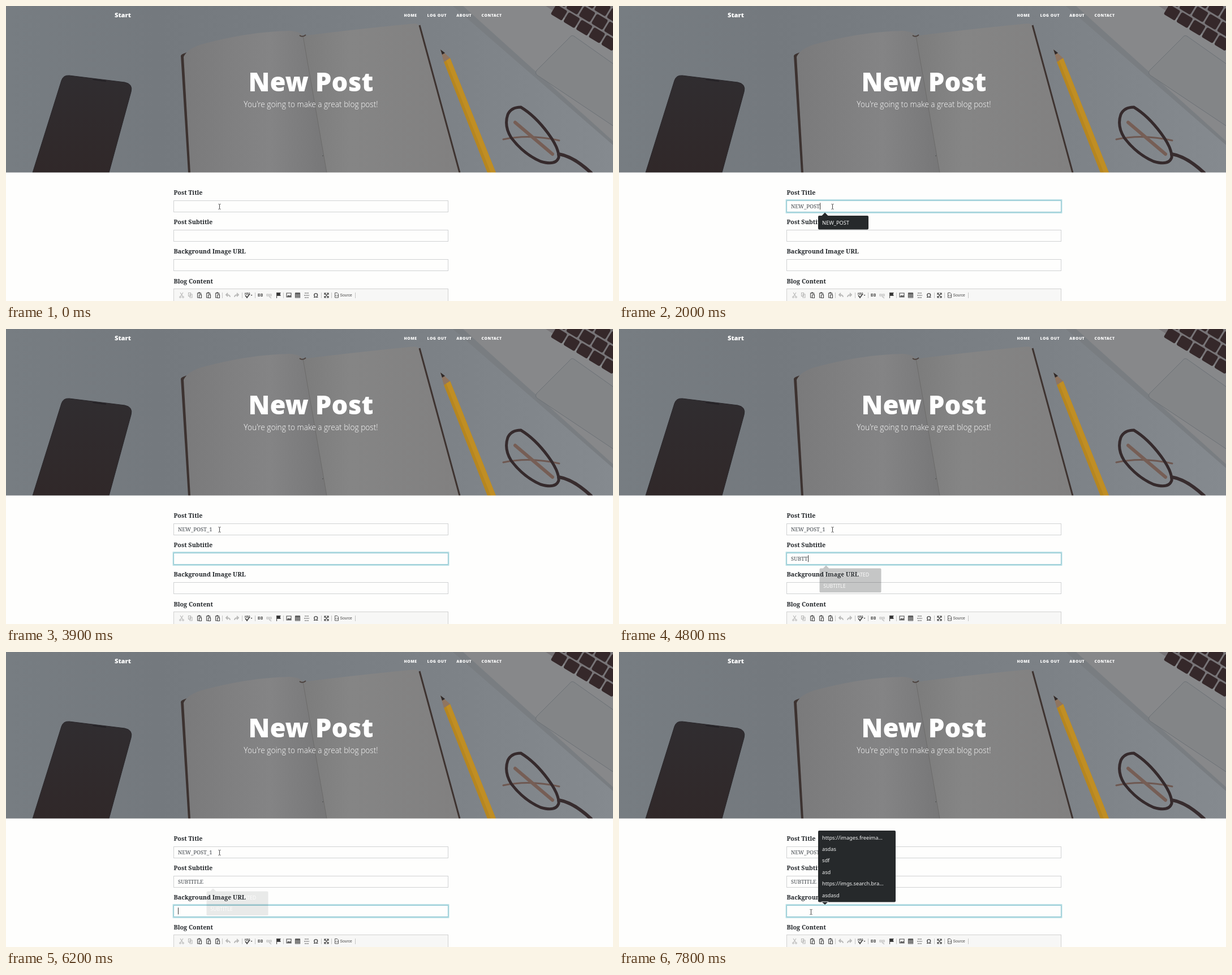
Recreate the animation shown at these times as an HTML page. Size 1073 by 522 pixels, loop 8000 ms.

```html
<!DOCTYPE html>
<html lang="en">
<head>
<meta charset="utf-8">
<title>New Post</title>
<style>
  html, body { margin: 0; width: 100%; height: 100%; overflow: hidden; background: #fefefd; }
  svg { display: block; width: 1073px; height: 522px; }
  text { white-space: pre; }
  .sans { font-family: "Open Sans", sans-serif; font-weight: 800; fill: #fff; }
  .nav { font-size: 6.8px; letter-spacing: .56px; }
  .label { font: 700 10.75px "Noto Serif", serif; fill: #212529; }
  .value { font: 9.5px "Noto Serif", serif; fill: #40464c; }
  .item { font: 500 9.25px "Noto Sans", sans-serif; fill: #f4f5f5; }
</style>
</head>
<body>
<svg id="stage" viewBox="0 0 1073 522">
  <defs>
    <linearGradient id="desk">
      <stop offset="0" stop-color="#777d82"/><stop offset=".25" stop-color="#74797e"/>
      <stop offset=".7" stop-color="#7c8186"/><stop offset="1" stop-color="#858a8f"/>
    </linearGradient>
    <linearGradient id="leftPage">
      <stop offset="0" stop-color="#7a7a7b"/><stop offset=".6" stop-color="#848485"/><stop offset="1" stop-color="#777778"/>
    </linearGradient>
    <linearGradient id="rightPage">
      <stop offset="0" stop-color="#7c7c7c"/><stop offset=".3" stop-color="#858585"/><stop offset="1" stop-color="#818080"/>
    </linearGradient>
    <linearGradient id="phone" x2="0" y2="1">
      <stop offset="0" stop-color="#302d30"/><stop offset="1" stop-color="#302829"/>
    </linearGradient>
  </defs>

  <g id="hero">
    <rect width="1073" height="295" fill="url(#desk)"/>
    <path d="M47 295 98 132Q101 122 112 123L210 135Q225 138 221 152L182 295Z" fill="url(#phone)" stroke="#29272b"/>
    <path d="M154 130 176 133" stroke="#242226" stroke-width="2" stroke-linecap="round"/>

    <path d="M309 88Q310 84 326 81L330 295H322Z" fill="#3c3230"/>
    <path d="M314 90Q320 76 345 68Q430 45 502 44Q520 45 525 53L567 295H326Z" fill="url(#leftPage)"/>
    <path d="M525 53Q600 43 722 31Q730 31 733 39L801 295H567Z" fill="url(#rightPage)"/>
    <path d="M525 53 567 295" stroke="#6c6b6a" fill="none"/>
    <path d="M519 52Q524 56 530 51" stroke="#4a403c" stroke-width="2" fill="none"/>
    <path d="M731 34 802 295" stroke="#3e3330" stroke-width="3"/>
    <circle cx="560" cy="265" r=".8" fill="#444"/>

    <path d="M774 99 851 295H866L785 92Z" fill="#b68620"/>
    <path d="M778 96 857 295H866L785 92Z" fill="#c08e24"/>
    <path d="M768 77 774 99 785 92Z" fill="#8f7561"/>
    <path d="M768 77 771 86 776 83Z" fill="#2f2929"/>

    <path d="M790 0H1073V246Z" fill="#797d81"/>
    <path d="M808 0H1073V239Z" fill="#87888a"/>
    <path d="M1073 102 1005 54Q1000 50 996 56L938 114Q934 119 940 123L1073 212" fill="#838587" stroke="#6c7176"/>
    <path d="M954 0 1073 76V0Z" fill="#777477"/>
    <g id="keys" transform="translate(976 -8) rotate(31)" fill="#35282a"></g>

    <g fill="none" stroke-linecap="round">
      <path d="M879 236Q925 226 978 238" stroke="#6e5851" stroke-width="3"/>
      <path d="M900 206 966 262" stroke="#765e55" stroke-width="6"/>
      <path d="M910 179Q893 179 887 192Q880 212 893 233Q915 262 945 275Q972 283 977 268Q978 252 958 225Q935 194 910 179Z" stroke="#352a2c" stroke-width="5"/>
      <path d="M977 262Q1003 266 1034 295" stroke="#372c2e" stroke-width="6"/>
    </g>
  </g>

  <g class="sans">
    <text x="192" y="20" font-size="11.2">Start</text>
    <g class="nav">
      <text x="703.5" y="18.6">HOME</text><text x="744.5" y="18.6">LOG OUT</text>
      <text x="796.3" y="18.6">ABOUT</text><text x="840.6" y="18.6">CONTACT</text>
    </g>
    <text x="539" y="151" font-size="45.4" text-anchor="middle">New Post</text>
    <text x="539" y="179" font-size="13.7" text-anchor="middle" style="font-weight:300">You're going to make a great blog post!</text>
  </g>

  <rect y="294.6" width="1073" height="228" fill="#fefefd"/>
  <g id="form"></g>
  <text class="label" x="296.5" y="491">Blog Content</text>

  <rect x="296.5" y="500.5" width="485" height="30" fill="#f7f7f6" stroke="#d1d1d1"/>
  <g fill="none" stroke="#484848" stroke-width="1.1">
    <g opacity=".35">
      <path d="M308 507 312.500 514M313 507 308.500 514"/><circle cx="308" cy="515" r="1.3"/><circle cx="313" cy="515" r="1.3"/>
      <path d="M322.500 507.500h4v6h-4zM325 510h4v6h-4z"/>
      <path d="M396 515Q396 511 390 511M392 508 389 511 392 514M404 515Q404 511 410 511M408 508 411 511 408 514" stroke-width="1.8"/>
      <path d="M461 510h3v3h-3zM466 510h3v3h-3zM465 514 469 517"/>
    </g>
    <g id="paste"></g>
    <path d="M423 512 426 516 431 509" stroke-width="1.8"/>
    <path d="M432.500 511h3l-1.500 2z" fill="#484848" stroke="none"/>
    <path d="M449 509.500h-3v4h3M450 509.500h3v4h-3M447 511.500h5" stroke-width="1.2"/>
    <path d="M478.500 507v10"/><path d="M479 507.500h6l-1 2 1 3h-6z" fill="#333"/>
    <path d="M496 508h8v7h-8z"/><path d="M496.500 514.500l2.500-3 2 1.500 1.500-1.500 1.500 3z" fill="#484848" stroke="none"/>
    <path d="M511.500 508h8v8h-8zM511.500 510.800h8M511.500 513.400h8M514.200 509v7M516.900 509v7"/><path d="M511.500 508.500h8" stroke-width="2"/>
    <path d="M528 508h7M528 516h7M527 512h9" stroke-dasharray="2 .6"/>
    <path d="M563 511v-3h3M567 508h3v3M570 513v3h-3M566 516h-3v-3M563.500 508.500l6 7M569.500 508.500l-6 7" stroke-width="1.2"/>
    <path d="M581.500 507.500h4l2 2v6.500h-6zM584 511l-1.200 1.300 1.200 1.300M585.500 511l1.200 1.300-1.200 1.300" stroke-width=".9"/>
    <path d="M382.500 507v10M417.500 507v10M440.500 507v10M490.500 507v10M557.500 507v10M575.500 507v10M617.500 507v10" stroke="#c4c4c4" stroke-width="1"/>
  </g>
  <g font-family="Liberation Sans, Arial, sans-serif" fill="#484848">
    <text x="421.500" y="511" font-size="4.6" font-weight="700">ABC</text>
    <text x="543.500" y="515.500" font-size="10.500" font-weight="700">Ω</text>
    <text x="590.500" y="514" font-size="6.700">Source</text>
  </g>

  <rect id="caret" width="1" height="12" fill="#333"/>
  <path id="cursor" d="M-2-4.500Q0-4.500 0-3.500Q0-4.500 2-4.500M0-3.500V3.500M-2 4.500Q0 4.500 0 3.500Q0 4.500 2 4.500" fill="none" stroke="#444"/>
  <g id="popups"></g>
</svg>

<script>
const LOOP = 8000, ROW = 20.4, GHOST_SCALE = .956;
const byId = id => document.getElementById(id);

function add(parent, tag, attrs, text) {
  const node = document.createElementNS('http://www.w3.org/2000/svg', tag);
  for (const name in attrs) node.setAttribute(name, attrs[name]);
  if (text) node.textContent = text;
  return parent.appendChild(node);
}

// Value of the latest [time, value] step that has begun.
function at(steps, t) {
  let value = steps[0][1];
  for (const [start, next] of steps) if (t >= start) value = next;
  return value;
}

for (let row = 0; row < 3; row++)
  for (let col = 0; col < 6; col++)
    add(byId('keys'), 'rect', { x: col * 26 - row * 8, y: 6 - row * 23, width: 23, height: 20, rx: 3 });

for (const x of [342, 358, 374]) {
  add(byId('paste'), 'path', { d: `M${x - 3.5} 508h6v8h-6z` });
  add(byId('paste'), 'path', { d: `M${x - 2} 507.500h3`, 'stroke-width': 2 });
  add(byId('paste'), 'path', { d: `M${x - .5} 511h4v5.500h-4z`, fill: '#f7f7f6' });
}

function makeField(label, y, typed, focus) {
  const form = byId('form');
  const box = { x: 296.5, y: y + .5, width: 485, height: 20 };
  add(form, 'text', { class: 'label', x: 296.5, y: y - 9.7 }, label);
  const ring = add(form, 'rect', { x: 294.5, y: y - 2, width: 489, height: 25, rx: 1, fill: '#b9dfe5' });
  add(form, 'rect', { ...box, fill: '#fefefd', stroke: '#d0d2d3' });
  const border = add(form, 'rect', { ...box, fill: 'none', stroke: '#8cc5d0' });
  const value = add(form, 'text', { class: 'value', x: 304, y: y + 14.2 });
  return { y, typed, focus, ring, border, value };
}

const fields = [
  makeField('Post Title', 344, [[0, ''], [1200, 'NE'], [1400, 'NEW'], [1500, 'NEW_'], [1600, 'NEW_P'],
    [1800, 'NEW_POS'], [2000, 'NEW_POST'], [2900, 'NEW_POST_'], [3300, 'NEW_POST_1']],
    [[0, 0], [400, .2], [500, .75], [600, 1], [3400, .4], [3500, 0]]),
  makeField('Post Subtitle', 396, [[0, ''], [4200, 'SU'], [4400, 'SUB'], [4500, 'SUBT'], [4600, 'SUBTT'],
    [5000, 'SUBT'], [5400, 'SUBTIT'], [5700, 'SUBTITLE']],
    [[0, 0], [3400, .6], [3500, 1], [6000, .75], [6100, .25], [6200, 0]]),
  makeField('Background Image URL', 448, [[0, '']],
    [[0, 0], [6000, .25], [6100, .75], [6200, 1]])
];

function makePopup(x, y, width, items, alpha, below = true) {
  const group = add(byId('popups'), 'g', {});
  const height = items.length * ROW + 4;
  const [base, tip] = below ? [y + 1, y - 5.5] : [y + height - 1, y + height + 4.5];
  add(group, 'path', {
    d: `M${x + 2} ${y}h${width - 4}q2 0 2 2v${height - 4}q0 2-2 2h${4 - width}q-2 0-2-2v${4 - height}q0-2 2-2z
        M${x + 5.5} ${base}L${x + 12} ${tip} ${x + 18.5} ${base}z`,
    fill: '#26292b'
  });
  items.forEach((item, i) =>
    add(group, 'text', { class: 'item', x: x + 7, y: y + 15.6 + i * ROW }, item));
  return { group, alpha, cx: x + width / 2, cy: y + 11 };
}

const popups = [
  makePopup(352, 371, 135, ['test', 'sfdsf', 'POST_FROM_NEW_USER', 'SECOND POST', 'NEW_POST'],
    [[0, 0], [400, 1], [1200, 0]]),
  makePopup(352, 371, 89, ['NEW_POST'],
    [[0, 0], [1200, 1], [2100, .6], [2200, .26], [2500, .09], [2600, 0]]),
  makePopup(352, 423, 114, ['SUBTITLE UPDATED', 'SUBTITLE'],
    [[0, 0], [4200, 1], [4700, .6], [4800, .26], [5000, 1], [6000, .6], [6100, .26], [6200, .09], [6400, 0]]),
  makePopup(352, 316, 137, ['https://images.freeima…', 'asdas', 'sdf', 'asd', 'https://imgs.search.bra…', 'asdasd'],
    [[0, 0], [7800, 1]], false)
];

const caretField = [[0, -1], [400, 0], [1000, -1], [1200, 0], [2500, -1], [2900, 0], [3400, 1],
  [3900, -1], [4200, 1], [6000, 2], [6600, -1], [7100, 2], [7800, -1]];
const pointer = [[0, [377.5, 355]], [7100, [379, 368]], [7200, [372, 415]], [7300, [358, 495]],
  [7400, [353, 490]], [7600, [339.5, 460]]];

function render(t) {
  for (const f of fields) {
    const focus = at(f.focus, t);
    f.ring.setAttribute('opacity', focus);
    f.border.setAttribute('opacity', Math.sqrt(focus));
    f.value.textContent = at(f.typed, t);
  }
  for (const p of popups) {
    const alpha = at(p.alpha, t), scale = alpha < 1 ? GHOST_SCALE : 1;
    p.group.setAttribute('opacity', alpha);
    p.group.setAttribute('transform', `translate(${p.cx} ${p.cy}) scale(${scale}) translate(${-p.cx} ${-p.cy})`);
  }
  const active = fields[at(caretField, t)], caret = byId('caret');
  caret.setAttribute('opacity', active ? 1 : 0);
  if (active) {
    const width = active.value.textContent ? active.value.getComputedTextLength() : 0;
    caret.setAttribute('x', Math.round(304 + width));
    caret.setAttribute('y', active.y + 4.3);
  }
  byId('cursor').setAttribute('transform', `translate(${at(pointer, t)})`);
}

function frame() {
  render(performance.now() % LOOP);
  requestAnimationFrame(frame);
}
frame();
</script>
</body>
</html>
```
